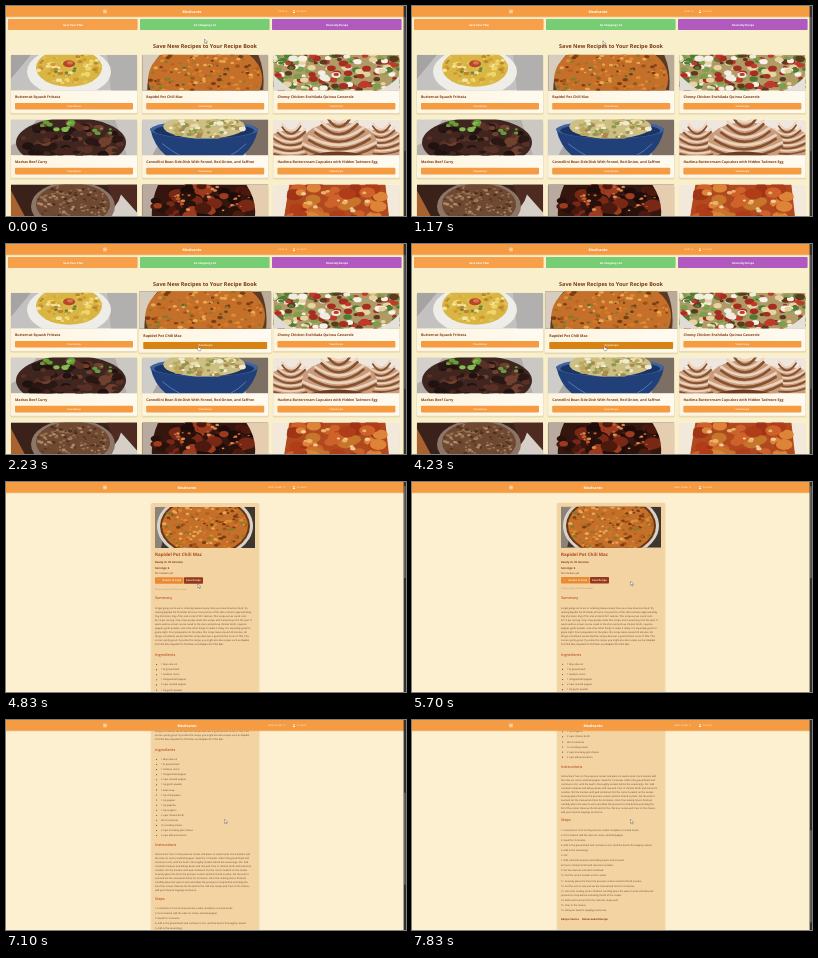
Recreate the animation shown at these times as an HTML page. Size 400 by 210 pixels, loop 8000 ms.

```html
<!DOCTYPE html>
<html lang="en">
<head>
<meta charset="utf-8">
<title>Recipe book</title>
<style>
html, body { margin: 0; width: 100%; height: 100%; overflow: hidden; background: #f9efcb; }
svg { display: block; }
#stage { width: 100vw; height: 100vh; }
text { font-family: "Open Sans", "Noto Sans", sans-serif; white-space: pre; text-rendering: geometricPrecision; }
</style>
</head>
<body>
<svg id="stage" viewBox="0 0 400 210"></svg>
<script>
const LOOP = 8000, OPEN_PAGE = 4330;
const BROWN = '#7c3a18', RUST = '#a9481c', ORANGE = '#f59b42', INK = '#5b4028';

// ---- drawing helpers ----
const rect = (x, y, w, h, fill, extra = '') =>
  `<rect x="${x}" y="${y}" width="${w}" height="${h}" fill="${fill}" ${extra}/>`;
const oval = (cx, cy, rx, ry, fill, extra = '') =>
  `<ellipse cx="${cx}" cy="${cy}" rx="${rx}" ry="${ry}" fill="${fill}" ${extra}/>`;
const shape = (d, fill, extra = '') => `<path d="${d}" fill="${fill}" ${extra}/>`;
const line = (d, stroke, width) => shape(d, 'none', `stroke="${stroke}" stroke-width="${width}"`);
// y is the visual middle of the line
const label = (x, y, str, size, fill, weight = 400, anchor = 'start') =>
  `<text x="${x}" y="${y + size * 0.34}" font-size="${size}" fill="${fill}" font-weight="${weight}" text-anchor="${anchor}">${str}</text>`;
const crop = (x, y, w, h, content) =>
  `<svg x="${x}" y="${y}" width="${w}" height="${h}" viewBox="0 0 ${w} ${h}">${content}</svg>`;

let seed = 11;
const random = () => (seed = seed * 16807 % 2147483647) / 2147483647;

// Scatter n small ovals inside an ellipse (or a box when round is false)
function bits(n, colors, size, cx, cy, rx, ry, round = true) {
  let out = '';
  for (let i = 0; i < n; i++) {
    const a = random() * 2 * Math.PI, r = Math.sqrt(random());
    const x = cx + rx * (round ? r * Math.cos(a) : random() * 2 - 1);
    const y = cy + ry * (round ? r * Math.sin(a) : random() * 2 - 1);
    const s = size * (0.5 + random() * 0.7);
    out += oval(x.toFixed(1), y.toFixed(1), s.toFixed(1), (s * 0.65).toFixed(1), colors[i % colors.length]);
  }
  return out;
}

// ---- food pictures, each 126 x 36 ----
const CHILI = ['#df8c34', '#a1521a', '#eaa850', '#b8631f', '#d27a26', '#7c3c14', '#8a7a2e'];

const frittata = () => rect(0, 0, 126, 36, '#c3c2c0') +
  shape('M0 0H20L0 24Z', '#a5a4a3') + shape('M96 0H126V36H100Z', '#b2b0ae') +
  oval(58, 17, 42, 24, '#efede8') + oval(58, 13, 33, 19, '#d9b544') +
  bits(70, ['#f0d66a', '#cf9a2e', '#f3e39c', '#b7862f', '#dfc254'], 2.6, 58, 13, 31, 17) +
  bits(5, ['#6d8438'], 1.8, 52, 13, 16, 6) + oval(58, 9, 6, 3.6, '#b8452a') + oval(59, 8, 3, 1.8, '#d9764a');

const chili = () => rect(0, 0, 126, 36, '#5c3a22') +
  shape('M0 0H18Q5 14 5 36H0Z', '#d6cdbf') + shape('M126 0H116Q123 16 121 36H126Z', '#b9ab98') +
  oval(63, 24, 57, 38, '#c4702a') + bits(230, CHILI, 2.3, 63, 24, 55, 36) +
  bits(10, ['#4e4a1f', '#5f6a2c'], 1.8, 68, 18, 40, 16);

const casserole = () => rect(0, 0, 126, 36, '#b09a66') +
  bits(210, ['#c0392a', '#4f7c34', '#f0ece0', '#a52e20', '#7aa04c', '#e6d3a0', '#5c3a20', '#f6f2e8'], 4, 63, 18, 64, 19, false) +
  shape('M0 20Q10 30 20 36H0Z', '#dfdcd6') + shape('M104 36Q118 31 126 21V36Z', '#e4e1db');

const curry = () => rect(0, 0, 126, 36, '#b3aea9') +
  shape('M0 0H26L8 22L0 26Z', '#d4d1cd') + shape('M104 0H126V36H116Z', '#cbc7c2') +
  oval(60, 23, 55, 25, '#3d2620') +
  bits(95, ['#5a3026', '#2a1714', '#71402f', '#44251e', '#1f1210'], 5.5, 60, 22, 52, 20) +
  bits(12, ['#62a035', '#83bd52'], 3.4, 46, 6, 20, 5) + bits(6, ['#6a9a40'], 2.4, 92, 10, 12, 5);

const beans = () => rect(0, 0, 126, 36, '#a9a8a6') +
  shape('M0 0H30L10 36H0Z', '#cfcdca') + shape('M96 0H126V36H104Z', '#7d6f64') +
  shape('M8 9Q14 38 44 46H82Q111 36 116 9Z', '#213f78') + oval(62, 10, 54, 9, '#3f639f') +
  oval(62, 11, 50, 7.5, '#1b3466') + oval(62, 7, 41, 12, '#cdbf82') +
  bits(85, ['#e8dda8', '#b9a960', '#8f9850', '#f1ead0', '#a98a54'], 3, 62, 7, 39, 11) +
  line('M20 24Q30 32 38 36M104 24Q96 32 88 36', '#5379b5', 1);

const cupcakes = () => {
  const swirl = (x, y, s) => {
    let out = oval(x, y + 3 * s, 30 * s, 17 * s, '#c89c7c');
    for (let i = 0; i < 5; i++) {
      const w = (30 - i * 5) * s, top = y + (10 - i * 6) * s;
      out += line(`M${x - w} ${top - 4 * s}Q${x} ${top + 12 * s} ${x + w} ${top - 5 * s}`, '#85512f', 2 * s) +
        line(`M${x - w} ${top - 7 * s}Q${x} ${top + 8 * s} ${x + w} ${top - 8 * s}`, '#ecd3bd', 2 * s);
    }
    return out;
  };
  return rect(0, 0, 126, 36, '#efe6dd') + swirl(18, 24, 0.95) + swirl(108, 22, 0.9) + swirl(66, 20, 1.25) +
    shape('M36 36Q64 28 92 36Z', '#6b3c22');
};

const oats = () => rect(0, 0, 126, 36, '#3a221a') +
  shape('M0 6L16 36H0Z', '#a8622f') + shape('M96 0H126V36H110Z', '#4f2a20') +
  shape('M84 36Q106 26 110 10L126 28V36Z', '#d6cfc8') +
  oval(62, 22, 42, 25, '#8d7668') + oval(62, 20, 37, 21, '#6f4931') +
  bits(170, ['#96704f', '#50311f', '#ad8a69', '#6b4630'], 1.8, 62, 20, 36, 20);

const roast = () => rect(0, 0, 126, 36, '#35160f') +
  shape('M0 0H16Q8 18 10 36H0Z', '#b9aaa0') +
  bits(70, ['#7a2816', '#1d0c09', '#9c3b1e', '#4c190f', '#28100b'], 7.5, 62, 17, 52, 18) +
  bits(24, ['#c45a2a', '#d98a50'], 2, 66, 15, 42, 13) +
  shape('M104 0H126V36H112Q116 18 104 0Z', '#e5cdb0');

const peaches = () => rect(0, 0, 126, 36, '#f3e9da') +
  shape('M16 0H112L116 36H10Z', '#b04a1e') +
  bits(48, ['#cf622a', '#b03c18', '#dd8438', '#a03416', '#c8752c'], 8, 63, 18, 44, 18, false) +
  bits(14, ['#e8b46c', '#efcf95'], 2.4, 62, 17, 42, 14) +
  shape('M0 0H15L10 36H0Z', '#f3e9da') + shape('M113 0H126V36H117Z', '#f3e9da');

const RECIPES = [
  ['Butternut Squash Frittata', frittata],
  ['Rapidel Pot Chili Mac', chili],
  ['Cheesy Chicken Enchilada Quinoa Casserole', casserole],
  ['Madras Beef Curry', curry],
  ['Cannellini Bean Side Dish With Fennel, Red Onion, and Saffron', beans],
  ['Hazlima Buttercream Cupcakes with Hidden Tadmore Egg', cupcakes],
  ['Slow Cooker Steel Cut Oats', oats],
  ['Smoky Oven Roast', roast],
  ['Baked Summer Peaches', peaches]
];

// ---- pages ----
function header(titleX, greeting, greetingX) {
  return rect(0, 0, 400, 10.8, ORANGE) + rect(0, 10.8, 400, 0.6, '#d9a869', 'opacity=".4"') +
    line('M97.2 4.2H100.8M97.2 5.5H100.8M97.2 6.8H100.8', '#fff', 0.6) +
    label(titleX, 5.5, 'Mealvanto', 3.6, '#fff', 700, 'middle') +
    label(greetingX, 5.5, greeting, 2.5, '#fff4e0') +
    oval(288, 4.7, 0.7, 0.7, '#fff') + shape('M286.8 6.9Q288 4.8 289.2 6.9Z', '#fff') +
    label(291, 5.5, 'Account', 2.5, '#fff4e0');
}

function card([title, picture], i) {
  const x = 5 + (i % 3) * 131.2, y = 48.8 + Math.floor(i / 3) * 64.8, hovered = i === 1;
  return `<g ${hovered ? 'id="hoverCard"' : ''}>` +
    rect(x - 0.5, y + 1, 127, 59, '#8a6a3a', 'opacity=".16" rx="1.5"') +
    rect(x, y, 126, 58.2, 'url(#paper)', 'rx="1"') + crop(x, y, 126, 35.6, picture()) +
    label(x + 4, y + 42, title, 3.5, BROWN, 700) +
    rect(x + 4, y + 48.2, 118, 6.6, ORANGE, `rx=".8" ${hovered ? 'id="hoverButton"' : ''}`) +
    label(x + 63, y + 51.5, 'View Recipe', 2.4, '#fff', 600, 'middle') + '</g>';
}

function tab(x, fill, str) {
  return rect(x, 13, 129.6, 11, fill, 'rx=".8"') + label(x + 65, 18.6, str, 2.7, '#fff', 700, 'middle');
}

function listPage() {
  const cards = RECIPES.map(card);
  cards.push(cards.splice(1, 1)[0]);
  return '<linearGradient id="paper" x2="1" y2=".3"><stop stop-color="#fcf3da"/><stop offset="1" stop-color="#fffaf0"/></linearGradient>' +
    rect(0, 0, 400, 210, '#f9efcb') +
    tab(2, '#f7a04c', 'Save Your Plan') + tab(134, '#77cd74', 'Go Shopping List') +
    tab(266, '#b05abf', 'Share My Recipe') +
    label(199, 40.6, 'Save New Recipes to Your Recipe Book', 5.45, BROWN, 700, 'middle') +
    cards.join('') + header(186, 'Hello  ▾', 272.5) +
    rect(397.6, 0, 2.4, 210, '#303030') + rect(398, 11, 1.6, 134, '#555');
}

const SUMMARY = [
  'Forget going out to eat or ordering takeout every time you crave American food. Try',
  'making Rapidel Pot Chili Mac at home. One portion of this dish contains approximately',
  '35g of protein, 25g of fat, and a total of 491 calories. This recipe serves 6 and costs',
  '$2.16 per serving. Only a few people made this recipe, and 3 would say it hit the spot. It',
  'works well as a main course. Head to the store and pick up chicken broth, cayenne',
  'pepper, garlic powder, and a few other things to make it today. It is especially good for',
  'game night. From preparation to the plate, this recipe takes around 30 minutes. All',
  'things considered, we decided this recipe deserves a good kitchen score of 74%. This',
  'score is pretty good. If you like this recipe, you might also like recipes such as Rapidel',
  'Pot Chili Mac, Rapidel Pot Chili Mac, and Rapidel Pot Chili Mac.'
];
const INGREDIENTS = [
  '1 tbsp olive oil', '1 lb ground beef', '1 medium onion', '1 chopped bell pepper',
  '2 cups roasted pepper', '1 tsp garlic powder', '1 bean soup', '1 tsp chili powder',
  '1 tsp pepper', '1 tsp paprika', '1 tsp oregano', '2 cups chicken broth', '28 oz tomatoes',
  '16 oz kidney beans', '2 cups monterey jack cheese', '2 cups elbow macaroni'
];
const INSTRUCTIONS = [
  'Instructions Turn on the pressure cooker and place on sauté mode. Once heated, add',
  'the olive oil, onion, and bell pepper. Sauté for 3 minutes. Add in the ground beef and',
  'continue to stir, until the beef is thoroughly cooked. Add in the seasonings. Stir. Add',
  'crushed tomatoes and kidney beans and mix well. Pour in chicken broth and macaroni',
  'noodles. Stir the mixture until well combined. Put the correct sealant on the cooker.',
  'Securely place the lid on the pressure cooker and lock the lid in place. Set the vent to',
  'seal and set the manual and time for 4 minutes. Once the cooking time is finished,',
  'carefully place the valve to vent and allow the pressure to stop before unlocking the',
  'lid of the cooker. Remove the lid and stir the chili mac recipe well. Pour in the cheese,',
  'add your favorite toppings and serve.'
];
const STEPS = [
  '1. Instructions: Turn on the pressure cooker and place on sauté mode.',
  '2. Once heated, add the olive oil, onion, and bell pepper.', '3. Sauté for 3 minutes.',
  '4. Add in the ground beef and continue to stir, until the beef is thoroughly cooked.',
  '5. Add in the seasonings.', '6. Stir.', '7. Add crushed tomatoes and kidney beans and mix well.',
  '8. Pour in chicken broth and macaroni noodles.', '9. Stir the mixture until well combined.',
  '10. Put the correct sealant on the cooker.',
  '11. Securely place the lid on the pressure cooker and lock the lid in place.',
  '12. Set the vent to seal and set the manual and time for 4 minutes.',
  '13. Once the cooking time is finished, carefully place the valve to vent and allow the',
  '14. Remove the lid and stir the chili mac recipe well.', '15. Pour in the cheese.',
  '16. Add your favorite toppings and serve.'
];

function recipePage() {
  const left = 149;
  const heading = (y, str) => label(left, y, str, 3.7, '#b9551f', 600);
  const lines = (y, gap, list, x = left) =>
    list.map((str, i) => label(x, y + i * gap, str, 2.4, INK)).join('');
  const photo = rect(0, 0, 100, 41, '#3e352e') + shape('M0 0H16L6 41H0Z', '#8c8378') +
    oval(50, 19, 48, 33, '#d8d2c8') + oval(50, 19, 45, 30, '#6a3413') + oval(50, 19, 43, 28, '#c4702a') +
    bits(240, CHILI, 2, 50, 19, 42, 27);
  return rect(0, 0, 400, 210, '#fcf0d1') + '<g id="recipe">' +
    rect(144.6, 21.4, 109, 420, '#b98a50', 'opacity=".2" rx="1"') +
    rect(145.4, 21, 107.4, 420, '#f4d3a3', 'rx="1"') + crop(149, 25, 100, 41, photo) +
    label(left, 72.6, 'Rapidel Pot Chili Mac', 4.5, RUST, 700) +
    label(left, 80, 'Ready in: 30 minutes', 2.7, BROWN, 700) +
    label(left, 86, 'Servings: 6', 2.7, BROWN, 700) +
    label(left, 91.4, 'No reviews yet', 2.7, BROWN) +
    rect(149, 95.2, 28.6, 6.6, '#ea8a34', 'rx=".8"') +
    label(151, 98.4, '♡', 2.8, '#fff') + label(156.5, 98.5, 'Return to Feed', 2.6, '#fff', 600) +
    rect(178, 95.2, 19, 6.6, '#96391a', 'rx=".8"') +
    label(187.5, 98.5, 'Save Recipe', 2.6, '#fff', 600, 'middle') +
    label(left, 107, 'Did you enjoy it? Write a review', 2.2, '#b98a58') +
    heading(115.6, 'Summary') + lines(126, 4.03, SUMMARY) +
    heading(173, 'Ingredients') + lines(182.4, 5.07, INGREDIENTS, 155) +
    INGREDIENTS.map((_, i) => oval(150.6, 182.6 + i * 5.07, 0.55, 0.55, INK)).join('') +
    heading(268, 'Instructions') + lines(277.6, 3.98, INSTRUCTIONS) +
    heading(321.5, 'Steps') + lines(331.5, 5.07, STEPS.slice(0, 13)) +
    lines(396.4, 5, ['pressure to stop before unlocking the lid of the cooker.']) +
    lines(401.4, 5.07, STEPS.slice(13)) +
    label(left, 420.5, 'Recipe Source    Homecooked Recipe', 2.6, BROWN, 700) + '</g>' +
    header(181, 'Hello, Guest  ▾', 262) +
    rect(397.6, 0, 2.4, 210, '#303030') + rect(398, 4, 1.6, 92, '#666', 'id="thumb"');
}

const ARROW = 'M0 0V4.2L1 3.3L1.7 4.8L2.4 4.5L1.7 3.1H3Z';
const HAND = 'M.7 0Q1.3 0 1.3 .7V2L3.2 2.5Q3.6 2.7 3.4 3.4L2.9 5H1L-.5 3.1Q-.4 2.5 .2 2.9V.7Q.2 0 .7 0Z';

const $ = id => document.getElementById(id);
$('stage').innerHTML = `<g id="list">${listPage()}</g><g id="detail">${recipePage()}</g>` +
  shape(ARROW, '#fff', 'id="cursor" stroke="#333" stroke-width=".35"');

// ---- motion ----
const clamp = p => Math.min(1, Math.max(0, p));
const linear = p => p, smooth = p => p * p * (3 - 2 * p), easeOut = p => 1 - (1 - p) ** 2;
const between = (t, from, to, ease = smooth) => ease(clamp((t - from) / (to - from)));

function draw(t) {
  const onList = t < OPEN_PAGE;
  $('list').style.display = onList ? '' : 'none';
  $('detail').style.display = onList ? 'none' : '';

  const aim = between(t, 1000, 1170), down = between(t, 1430, 2230), aside = between(t, 4800, 5400);
  const x = 198.5 - 7.5 * aim + down * 0.6 + 27 * aside;
  const y = 33 + 1.8 * aim + 67 * down - 2.6 * aside;
  $('cursor').setAttribute('transform', `translate(${x} ${y})`);
  $('cursor').setAttribute('d', onList && y > 96 ? HAND : ARROW);

  const grow = 1 + 0.05 * between(t, 1650, 1950);
  $('hoverCard').setAttribute('transform', `translate(199.2 78) scale(${grow}) translate(-199.2 -78)`);
  const dark = between(t, 2040, 2190);
  $('hoverButton').setAttribute('fill', `rgb(${245 - 28 * dark},${155 - 25 * dark},${66 - 46 * dark})`);

  const scroll = 66 * between(t, 5700, 6170, easeOut) + 60 * between(t, 6370, 6800, easeOut) +
    17 * between(t, 6970, 7100, linear) + 78.5 * between(t, 7100, 7770, linear);
  $('recipe').setAttribute('transform', `translate(0 ${-scroll})`);
  $('thumb').setAttribute('y', 4 + scroll * 0.48);
}

const start = performance.now();
function tick() {
  draw((performance.now() - start) % LOOP);
  requestAnimationFrame(tick);
}
tick();
</script>
</body>
</html>
```
